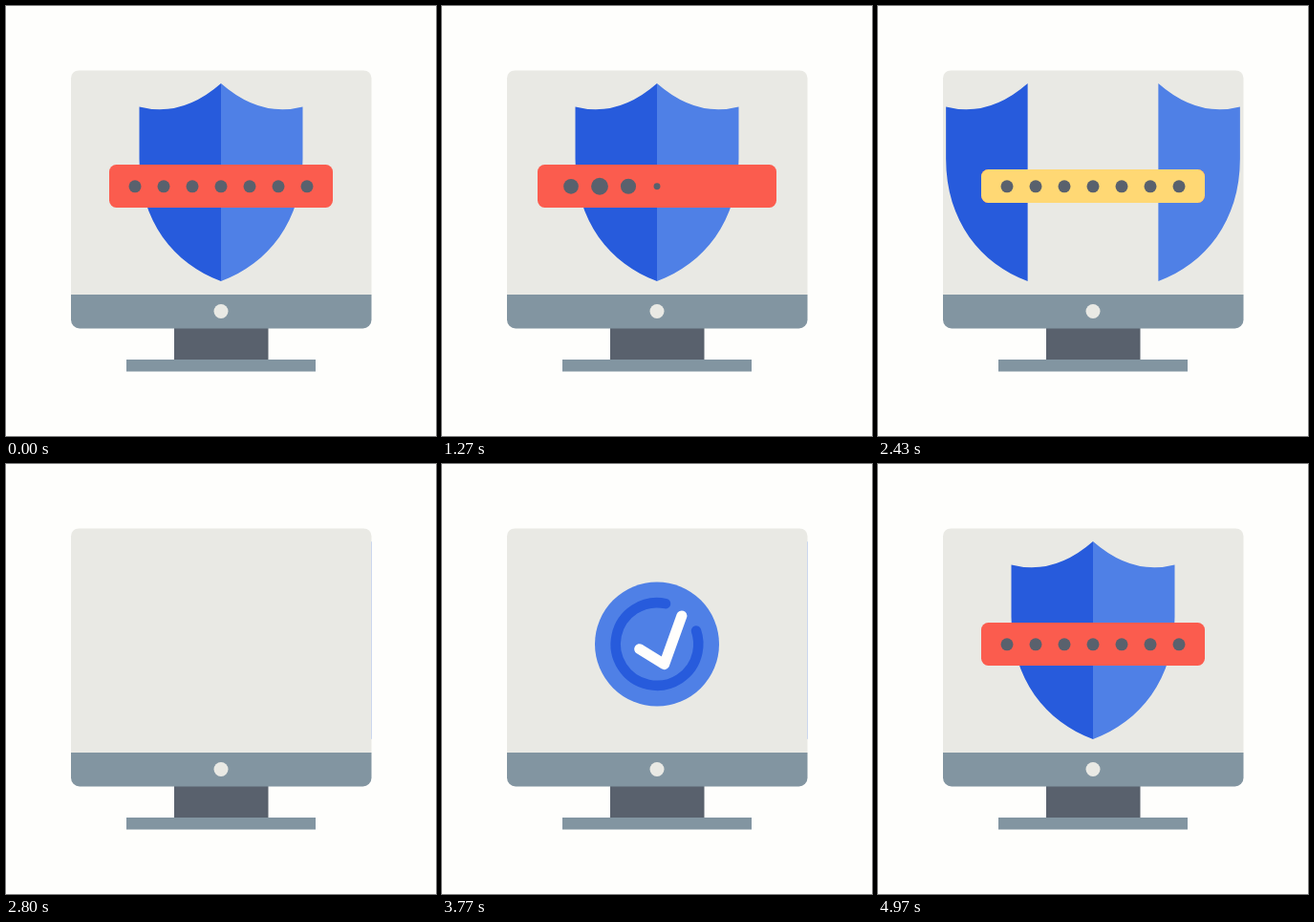
Recreate the animation shown at these times as an HTML page with a canvas. Size 450x450 px, loop 5.01 s.

```html
<!DOCTYPE html>
<html lang="en">
<head>
<meta charset="utf-8">
<title>Secure login</title>
<style>
  html, body { margin: 0; width: 100%; height: 100%; overflow: hidden; background: #fefefc; }
  canvas { display: block; width: 450px; height: 450px; }
</style>
</head>
<body>
<canvas id="stage"></canvas>
<script>
const LOOP = 5010;
const CX = 225, CY = 188.5;
const RAD = Math.PI / 180;
const COLOR = {
  paper: '#fefefc', screen: '#e9e9e4', bezel: '#8295a1', slate: '#59616d',
  dark: '#275bdc', light: '#4f80e6', tick: '#fffefc', red: '#fb5c4e', yellow: '#ffd874'
};

const canvas = document.getElementById('stage');
const ctx = canvas.getContext('2d');
const dpr = window.devicePixelRatio || 1;
canvas.width = canvas.height = 450 * dpr;

const span = (t, a, b) => Math.max(0, Math.min(1, (t - a) / (b - a)));
const smooth = (t, a, b) => 0.5 - 0.5 * Math.cos(Math.PI * span(t, a, b));

// Eases out past 1 and returns; a larger pull overshoots further
function back(t, a, b, pull) {
  const q = span(t, a, b) - 1;
  return 1 + (pull + 1) * q ** 3 + pull * q * q;
}

function box(x, y, w, h, r, color) {
  ctx.beginPath();
  ctx.roundRect(x, y, w, h, r);
  ctx.fillStyle = color;
  ctx.fill();
}

function circle(x, y, r, color) {
  ctx.beginPath();
  ctx.arc(x, y, Math.max(0, r), 0, Math.PI * 2);
  ctx.fillStyle = color;
  ctx.fill();
}

function stroke(width, color) {
  ctx.lineCap = ctx.lineJoin = 'round';
  ctx.lineWidth = width;
  ctx.strokeStyle = color;
  ctx.stroke();
}

function drawMonitor() {
  box(176, 336, 98.5, 35, 0, COLOR.slate);
  box(126, 370, 198, 12.5, 0, COLOR.bezel);
  box(68, 67.5, 314.5, 235, [8, 8, 0, 0], COLOR.screen);
  box(68, 302, 314.5, 35.5, [0, 0, 9, 9], COLOR.bezel);
  circle(225, 319.5, 7.5, COLOR.screen);
}

// Half of the shield; side is -1 for left, 1 for right
function drawHalf(side, shift) {
  ctx.save();
  ctx.translate(CX + side * shift, 0);
  ctx.scale(side, 1);
  ctx.beginPath();
  ctx.moveTo(0, 81);
  ctx.quadraticCurveTo(41, 117, 85.5, 105.5);
  ctx.lineTo(85.5, 160);
  ctx.bezierCurveTo(85.5, 225, 49, 270, 0, 288);
  ctx.closePath();
  ctx.fillStyle = side < 0 ? COLOR.dark : COLOR.light;
  ctx.fill();
  ctx.restore();
}

function drawShield(t) {
  const shift = 157.5 * (smooth(t, 2170, 2740) - smooth(t, 3980, 4500));
  ctx.save();
  ctx.beginPath();
  ctx.rect(68, 67.5, 314.5, 235);
  ctx.clip();
  drawHalf(-1, shift);
  drawHalf(1, shift);
  ctx.restore();
}

function drawDisc(t) {
  if (t < 3060 || t > 4500) return;
  const scale = back(t, 3050, 3650, 4);
  ctx.save();
  ctx.translate(CX, CY);
  ctx.scale(scale, scale);
  circle(0, 0, 65, COLOR.light);

  const start = -60.5 - 57.5 * Math.exp((3230 - t) / 454);
  const sweep = 288 * back(t, 3060, 4260, 1.14);
  ctx.beginPath();
  ctx.arc(0, 0, 43.3, start * RAD, (start - sweep) * RAD, true);
  stroke(10.5, COLOR.dark);

  ctx.rotate(70 * (1 - back(t, 3060, 4260, 3.2)) * RAD);
  const drawn = 84 * smooth(t, 3060, 3400);
  const short = span(drawn, 0, 30.5), long = span(drawn, 30.5, 84);
  ctx.beginPath();
  ctx.moveTo(-19, -0.5);
  ctx.lineTo(-19 + 20 * short, -0.5 + 23 * short);
  if (long > 0) ctx.lineTo(1 + 32.5 * long, 22.5 - 43 * long);
  stroke(11, COLOR.tick);
  ctx.restore();
}

function dotSize(t, i) {
  if (t < 1100) return 1 - smooth(t, 780 - i * 50, 930 - i * 50);
  if (t < 3000) return back(t, 1100 + i * 50, 1340 + i * 50, 4) * (1 - smooth(t, 2480, 2600));
  return back(t, 4490 + i * 40, 4730 + i * 40, 4);
}

function drawBar(t) {
  const swell = smooth(t, 250, 700) - smooth(t, 1050, 1260);
  const typing = smooth(t, 1050, 1260) - smooth(t, 1740, 1960);
  const bump = Math.sin(Math.PI * span(t, 1630, 1900));
  const returning = t > 3000;
  const grow = returning ? back(t, 4430, 4900, 1.4) : 1;
  const fold = returning ? smooth(t, 4430, 4560) : 1 - span(t, 2170, 2720) ** 2;
  const w = (234 + 54 * swell + 16 * typing) * grow;
  const h = (45 + 13 * swell + 16 * bump) * fold;
  if (w < 0.5 || h < 0.5) return;

  ctx.save();
  box(CX - w / 2, CY - h / 2, w, h, Math.min(7.5, w / 2, h / 2), COLOR.red);
  if (!returning) {
    ctx.globalAlpha = smooth(t, 1630, 1780);
    ctx.fillStyle = COLOR.yellow;
    ctx.fill();
    ctx.globalAlpha = 1;
  }
  ctx.clip();
  for (let i = 0; i < 7; i++) circle(135 + i * 30, CY + 0.3, 6.5 * dotSize(t, i), COLOR.slate);
  ctx.restore();
}

function draw(t) {
  ctx.setTransform(dpr, 0, 0, dpr, 0, 0);
  ctx.fillStyle = COLOR.paper;
  ctx.fillRect(0, 0, 450, 450);
  drawMonitor();
  drawDisc(t);
  drawShield(t);
  drawBar(t);
}

const begin = performance.now();
function frame() {
  draw((performance.now() - begin) % LOOP);
  requestAnimationFrame(frame);
}
frame();
</script>
</body>
</html>
```
